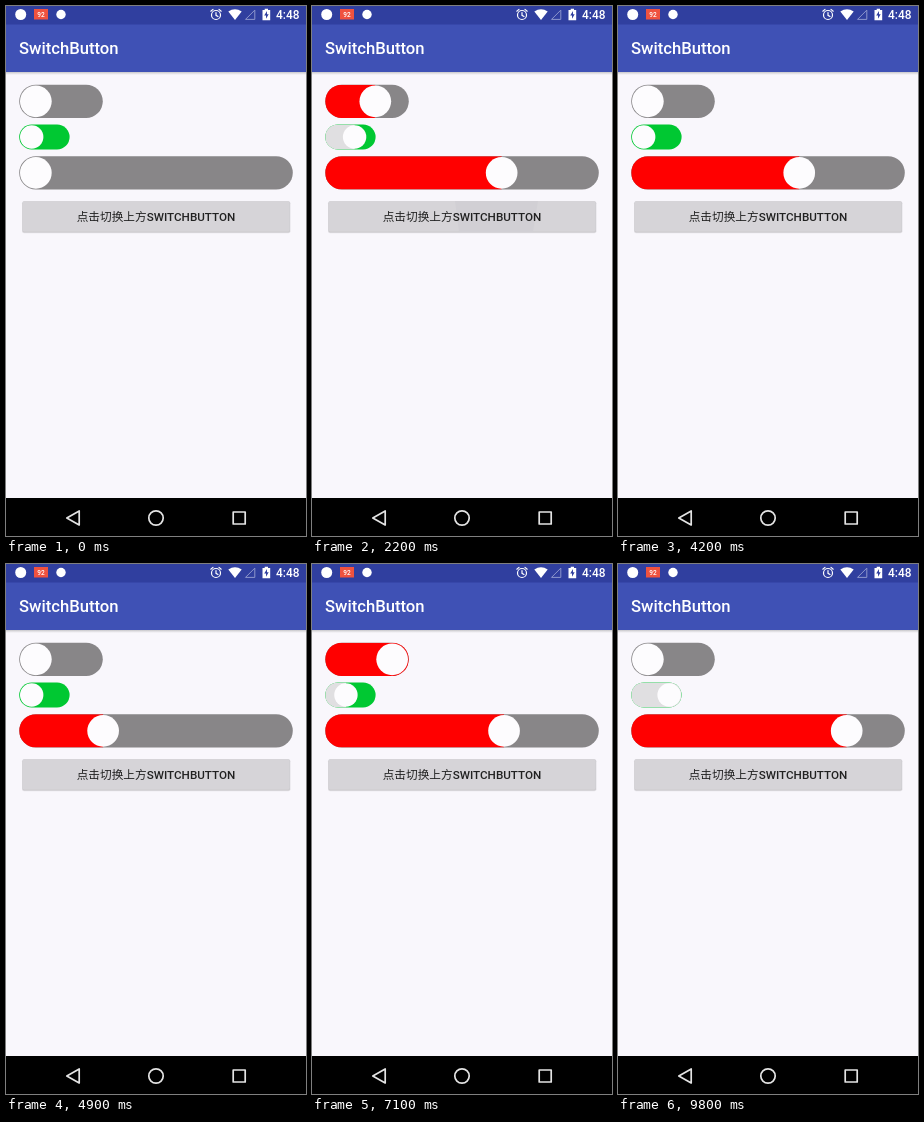
Write an HTML page that moves like this. It is 300 px wide and 530 px high and loops after 9900 ms.

```html
<!DOCTYPE html>
<html lang="zh">
<head>
<meta charset="utf-8">
<title>SwitchButton</title>
<style>
  html, body { margin: 0; width: 100%; height: 100%; overflow: hidden; background: #f9f7fc; }
  svg { display: block; width: 100vw; height: 100vh; }
  text { font-family: Roboto, sans-serif; font-weight: 500; }
  .cjk { font-family: "Noto Sans CJK SC", "Noto Sans CJK", sans-serif; font-weight: 400; }
  .nav { fill: none; stroke: #e4e4e4; stroke-width: 1.7; stroke-linejoin: round; }
  .line { fill: none; stroke: #fff; stroke-width: 1.2; stroke-linecap: round; }
  #ripple { animation: press 9.9s step-end infinite; }
  @keyframes press {
    0% { opacity: 0; }
    18.18% { opacity: 1; }
    27.27%, 100% { opacity: 0; }
  }
</style>
</head>
<body>
<svg id="stage" viewBox="0 0 300 530">
  <defs>
    <linearGradient id="shade" x2="0" y2="1">
      <stop stop-color="#777" stop-opacity=".55"/>
      <stop offset="1" stop-color="#999" stop-opacity="0"/>
    </linearGradient>
  </defs>
  <rect width="300" height="530" fill="#f9f7fc"/>

  <!-- bars -->
  <rect y="65" width="300" height="4" fill="url(#shade)"/>
  <rect width="300" height="66" fill="#3f51b5"/>
  <rect width="300" height="18.5" fill="#303f9f"/>
  <text x="13" y="48.3" font-size="16.67" fill="#fff">SwitchButton</text>

  <!-- status icons -->
  <g fill="#fff">
    <circle cx="14.7" cy="8.5" r="5.5"/>
    <rect x="28" y="3" width="14" height="10.5" fill="#f0523f"/>
    <text x="35" y="10.7" font-size="6.5" text-anchor="middle">92</text>
    <circle cx="55" cy="8.5" r="4.7"/>
    <g class="line">
      <circle cx="210" cy="9" r="4.5"/>
      <path d="M210 6.5V9.3L212 10.5M204.8 5.2L207 3.4M215.2 5.2L213 3.4"/>
    </g>
    <path d="M229 14L222.3 5.6Q229 1 235.7 5.6Z"/>
    <path d="M239.5 13.4H248.8V4.1Z" fill="none" stroke="#8d96cc" stroke-width="1"/>
    <path d="M256.5 4H258.7V2.8H262V4H264.2V14.2H256.5Z"/>
    <path d="M261 5L258.2 9.6H260V12.8L262.7 8.2H261Z" fill="#303f9f"/>
    <text x="270" y="13" font-size="11.9">4:48</text>
  </g>

  <g id="switches"></g>

  <!-- button -->
  <rect x="16" y="195.2" width="268.5" height="32" rx="2" fill="#000" opacity=".09"/>
  <rect x="16.5" y="195.5" width="267.5" height="31" rx="1.7" fill="#000" opacity=".12"/>
  <rect x="16.7" y="195" width="267" height="30.8" rx="1.7" fill="#d6d4d8"/>
  <path id="ripple" d="M143 195H226L221 225.8H147Z" fill="#d1cfd4"/>
  <text x="150" y="214.8" font-size="11.67" text-anchor="middle" fill="#212121"><tspan class="cjk">点击切换上方</tspan>SWITCHBUTTON</text>

  <!-- navigation -->
  <rect y="492" width="300" height="38" fill="#000"/>
  <g class="nav">
    <path d="M73.2 505V519L60.8 512Z"/>
    <circle cx="150" cy="512" r="7.2"/>
    <rect x="227.2" y="506" width="12" height="12"/>
  </g>
</svg>
<script>
  const LOOP = 9900, TICK = 100, SLIDE = 2000;
  const layer = document.getElementById('switches');

  function add(parent, tag, attrs) {
    const node = document.createElementNS('http://www.w3.org/2000/svg', tag);
    for (const key in attrs) node.setAttribute(key, attrs[key]);
    return parent.appendChild(node);
  }

  // Returns a setter taking a position from 0 (off) to 1 (on).
  function makeSwitch(id, y, width, height, offColor, onColor) {
    const x = 13.2, r = height / 2;
    const track = { x, y, width, height, rx: r };
    const clip = add(layer, 'clipPath', { id });
    add(clip, 'rect', track);
    add(layer, 'rect', { ...track, fill: offColor });
    const fill = add(layer, 'rect', { ...track, rx: 0, fill: onColor, 'clip-path': `url(#${id})` });
    const knob = add(layer, 'circle', { cy: y + r, r: r - 0.8, fill: '#fdfcfe' });
    return pos => {
      const center = r + pos * (width - height);
      fill.setAttribute('width', pos === 0 ? 0 : pos === 1 ? width : center);
      knob.setAttribute('cx', x + center);
    };
  }

  const setTop = makeSwitch('top', 78.7, 83.6, 33.3, '#888688', '#f00');
  const setSmall = makeSwitch('small', 118.5, 50.4, 25, '#00c832', '#e0dfe1');
  const setWide = makeSwitch('wide', 150.2, 273.6, 33.3, '#888688', '#f00');

  const slide = (t, start) => Math.min(1, Math.max(0, (t - start) / SLIDE));

  function draw(now) {
    const t = Math.floor(now % LOOP / TICK) * TICK;
    const first = slide(t, 870);
    setTop(t < 3500 ? first : t >= 5800 && t < 9400 ? 1 : 0);
    setSmall(t < 3500 ? first : t < 5800 ? 0 : t < 9400 ? 1 - slide(t, 5750) : 1);
    setWide(t < 3500 ? first
      : t < 5700 ? 1 - slide(t, 3460)
      : t < 9400 ? slide(t, 5750)
      : 1 - slide(t, 9455));
  }

  function frame() {
    draw(performance.now());
    requestAnimationFrame(frame);
  }
  frame();
</script>
</body>
</html>
```
